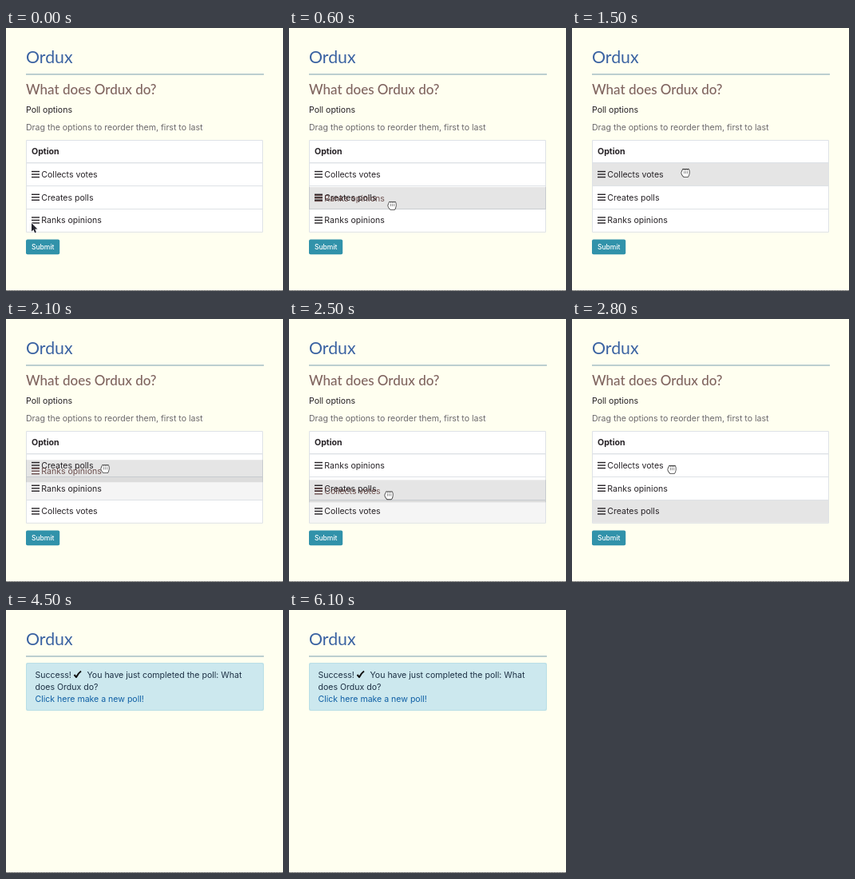
Write an HTML page with a canvas that moves like this. It is 347 px wide and 329 px high and loops after 6200 ms.

```html
<!DOCTYPE html>
<html lang="en">
<head>
<meta charset="utf-8">
<title>Poll</title>
<style>
html, body { margin: 0; width: 100%; height: 100%; overflow: hidden; background: #fffff0; }
canvas { display: block; }
</style>
</head>
<body>
<canvas id="stage" width="347" height="329"></canvas>
<script>
const ctx = document.getElementById('stage').getContext('2d');
const LOOP = 6200, STEP = 100, SUBMITTED = 3800, CURSOR_GONE = 4200;
const BRAND = 'Ordux';
const BODY = '10.55px Inter, sans-serif';
const INK = '#262226', BORDER = '#dee2e6';
const LEFT = 25, WIDTH = 297, TOP = 140, ROW = 28.7;

// Each drag moves an option between rows; grip is the pointer's offset from the row's middle.
const drags = [
  { start: 200, drop: 700, from: 2, to: 1, x: 130, grip: 9 },
  { start: 1000, drop: 1300, from: 2, to: 1, x: 138, grip: 2 },
  { start: 1500, drop: 1900, from: 0, to: 2, x: 143, grip: -2 },
  { start: 2000, drop: 2200, from: 1, to: 0, x: 125, grip: -3 },
  { start: 2400, drop: 2800, from: 2, to: 0, x: 126, grip: 5 }
];
const lastDrop = drags[drags.length - 1].drop;

const rowTop = i => TOP + ROW * (i + 1);
const rowMiddle = i => rowTop(i) + ROW / 2;
const easeOut = k => 1 - (1 - k) ** 2;
const mix = (a, b, k) => a + (b - a) * k;

const stops = [
  { t: 0, x: 32, y: 244 },
  ...drags.flatMap(({ start, drop, from, to, x, grip }) => [
    { t: start, x, y: rowMiddle(from) + grip },
    { t: drop, x, y: rowMiddle(to) + grip }
  ]),
  { t: 3500, x: 46, y: 278 },
  { t: SUBMITTED, x: 46, y: 278 },
  { t: CURSOR_GONE, x: 60, y: 306 }
];

function cursorAt(t) {
  const n = stops.findIndex(s => s.t > t);
  if (n < 0) return stops[stops.length - 1];
  const a = stops[n - 1], b = stops[n];
  const k = easeOut((t - a.t) / (b.t - a.t));
  return { x: mix(a.x, b.x, k), y: mix(a.y, b.y, k) };
}

function optionsAt(t) {
  const list = ['Collects votes', 'Creates polls', 'Ranks opinions'];
  for (const d of drags) {
    if (t >= d.drop) list.splice(d.to, 0, list.splice(d.from, 1)[0]);
  }
  return list;
}

function text(str, x, y, color = INK, font = BODY) {
  ctx.font = font;
  ctx.fillStyle = color;
  ctx.fillText(str, x, y);
}

function rect(x, y, w, h, color) {
  ctx.fillStyle = color;
  ctx.fillRect(x, y, w, h);
}

function roundBox(x, y, w, h, fill) {
  ctx.beginPath();
  ctx.roundRect(x, y, w, h, 2);
  ctx.fillStyle = fill;
  ctx.fill();
}

function option(label, middle, color) {
  for (const side of [-1, 0, 1]) rect(32, middle + side * 3.5 - 0.7, 10, 1.4, color);
  text(label, 44.3, middle + 3.8, color);
}

function outlined(fill, stroke) {
  ctx.lineJoin = 'round';
  ctx.lineWidth = 1.6;
  ctx.fillStyle = fill;
  ctx.strokeStyle = stroke;
  ctx.stroke();
  ctx.fill();
}

function arrow({ x, y }) {
  const points = [[0, 0], [0, 10.5], [2.4, 8.3], [4.1, 12.2], [5.9, 11.4], [4.3, 7.6], [7.4, 7.4]];
  ctx.beginPath();
  for (const [dx, dy] of points) ctx.lineTo(x + dx, y + dy);
  ctx.closePath();
  outlined('#25252d', '#fff');
}

function fist({ x, y }) {
  const knuckle = 2.1;
  ctx.save();
  ctx.translate(x - 0.7, y);
  ctx.beginPath();
  ctx.moveTo(-4, -2.6);
  for (let i = 0; i < 4; i++) {
    const left = -4 + i * knuckle;
    ctx.quadraticCurveTo(left + knuckle / 2, -6.2, left + knuckle, -2.6);
  }
  ctx.quadraticCurveTo(5, 2.5, 2.8, 5);
  ctx.lineTo(-2.2, 5);
  ctx.quadraticCurveTo(-5.4, 2, -5, -0.5);
  ctx.closePath();
  outlined('#fff', '#3a3a3a');
  for (let i = 0; i < 3; i++) rect(-2.2 + i * knuckle, -2, 0.8, 3.2, '#777');
  ctx.restore();
}

function drawHeader() {
  rect(0, 0, 347, 329, '#fffff0');
  text(BRAND, LEFT, 44, '#3b63a2', '21.3px Lato, sans-serif');
  rect(LEFT, 57.4, WIDTH + 1, 1.1, '#85a8b6');
  for (let x = 0; x < 347; x++) rect(x, 328, 1, 1, x % 2 ? '#aaa' : '#555');
}

function shadeRow(i, alpha) {
  rect(LEFT, rowTop(i), WIDTH, ROW, `rgba(0,0,0,${alpha})`);
}

function drawPoll(t, cursor) {
  const drag = drags.find(d => t >= d.start && t < d.drop);
  const dropped = drags.find(d => t === d.drop);
  const list = optionsAt(t);

  text(`What does ${BRAND} do?`, LEFT, 83, '#806560', '500 17px Lato, sans-serif');
  text('Poll options', LEFT, 106);
  text('Drag the options to reorder them, first to last', LEFT, 128, '#6b686c');

  rect(LEFT, TOP, WIDTH, ROW * 4, '#fff');
  text('Option', 32, 158, INK, 'bold 10.6px Inter, sans-serif');

  if (drag) {
    // The picked-up row quickly loses its highlight.
    shadeRow(drag.from, Math.max(0, 0.1 - 0.0006 * (t - drag.start)));
  } else {
    const hover = dropped ? dropped.from : Math.floor((cursor.y - rowTop(0)) / ROW);
    if (t > 0 && hover >= 0 && hover < list.length) shadeRow(hover, 0.1);
  }

  list.forEach((label, i) => {
    rect(LEFT, Math.floor(rowTop(i)), WIDTH, i ? 1 : 1.4, BORDER);
    option(label, rowMiddle(i), INK);
  });
  ctx.strokeStyle = BORDER;
  ctx.lineWidth = 1;
  ctx.strokeRect(LEFT + 0.5, TOP + 0.5, WIDTH - 1, ROW * 4);

  roundBox(LEFT, 264.5, 42.2, 18.7, '#3192aa');
  text('Submit', 32, 277, '#fff', '500 8.5px Inter, sans-serif');

  if (drag && t > drag.start) {
    const middle = cursor.y - drag.grip;
    rect(LEFT, middle - 14, WIDTH, 28, 'rgba(0,0,0,0.1)');
    option(list[drag.from], middle, 'rgba(75,38,36,0.78)');
  }
}

function drawSuccess() {
  roundBox(LEFT, 66, WIDTH + 1, 60, '#b9dfe6');
  roundBox(LEFT + 1, 67, WIDTH - 1, 58, '#cce8ee');
  const ink = '#1d3044';
  text('Success!', 36.5, 84.5, ink);
  ctx.beginPath();
  ctx.moveTo(85.5, 81);
  ctx.lineTo(88, 84);
  ctx.quadraticCurveTo(90, 79.5, 94, 76.5);
  ctx.strokeStyle = '#111';
  ctx.lineWidth = 2;
  ctx.stroke();
  text('You have just completed the poll: What', 101.5, 84.5, ink);
  text(`does ${BRAND} do?`, 36.5, 100, ink);
  text('Click here make a new poll!', 36.5, 115, '#0f5fa5');
}

function draw(now) {
  const t = Math.floor((now % LOOP) / STEP) * STEP;
  const cursor = cursorAt(t);
  drawHeader();
  if (t >= SUBMITTED) drawSuccess();
  else drawPoll(t, cursor);
  if (t >= drags[0].start && t <= lastDrop) fist(cursor);
  else if (t < CURSOR_GONE) arrow(cursor);
}

const begin = performance.now();
function tick() {
  draw(performance.now() - begin);
  requestAnimationFrame(tick);
}
tick();
</script>
</body>
</html>
```
